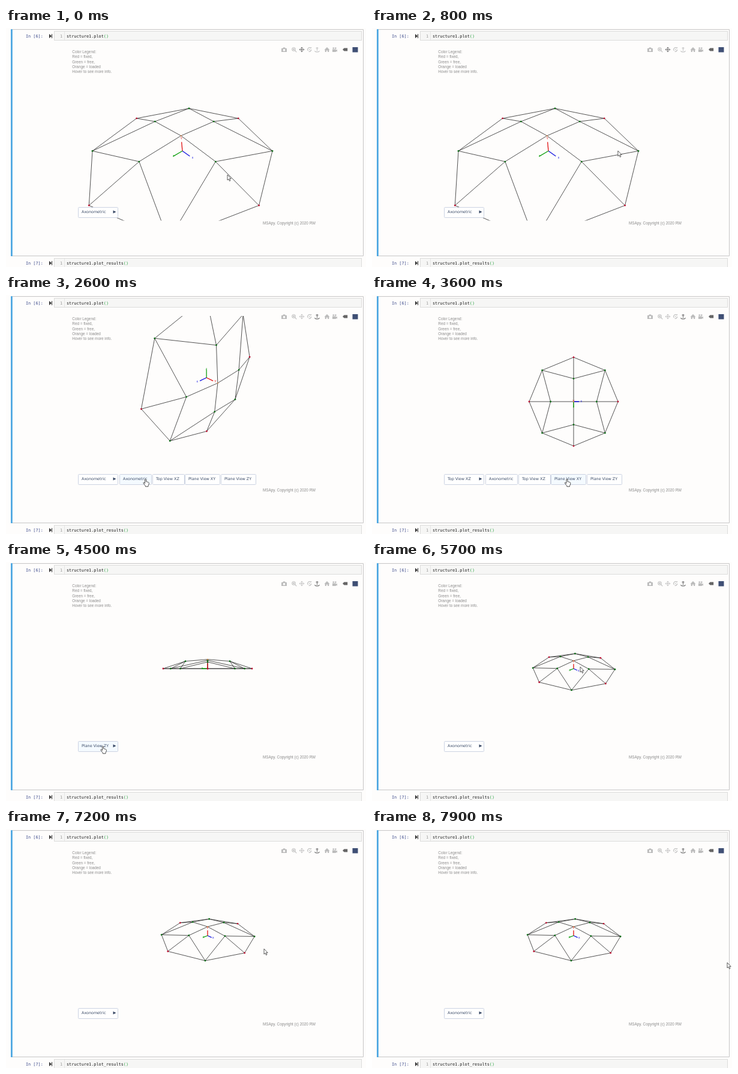
Animation of 600 by 399 pixels, one loop 8000 ms. Source, as an HTML page:

```html
<!DOCTYPE html>
<html lang="en">
<head>
<meta charset="utf-8">
<title>Dome viewer</title>
<style>
html, body { margin: 0; width: 100%; height: 100%; overflow: hidden; background: #fefdfc; }
svg { display: block; width: 600px; height: 399px; }
text { white-space: pre; }
.code { font: 6.85px "DejaVu Sans Mono", monospace; fill: #1c1c1c; }
.prompt { fill: #3c4a8c; }
.num { fill: #999; }
.paren { fill: #2aa040; }
.note { font: 6.37px Arial, "Liberation Sans", sans-serif; fill: #8c8c8c; }
.menu { font: 6.42px "DejaVu Sans", Verdana, sans-serif; fill: #3a4a66; }
.menu rect { stroke: #ccd3e2; stroke-width: 1; }
.tip { font: bold 6.9px Arial, "Liberation Sans", sans-serif; fill: #3a3a3a; }
.axis { font: 5px Arial, "Liberation Sans", sans-serif; text-anchor: middle; }
.icons { fill: none; stroke: #c2c2c2; stroke-width: 1.1; }
.icons .solid { fill: #bcbcbc; stroke: none; }
.icons .on { stroke: #6c6c6c; }
</style>
</head>
<body>
<svg id="stage" viewBox="0 0 600 399">
  <defs>
    <clipPath id="scene"><rect x="110" y="35" width="453" height="286.500"/></clipPath>
  </defs>

  <!-- notebook cells -->
  <path d="M10 2.500h585.500v378h-585.500" fill="none" stroke="#c6c6c6"/>
  <rect x="8" y="2" width="2.800" height="379" fill="#4fa8e2"/>
  <g id="cells"></g>

  <g class="note" id="legend"></g>
  <text class="note" x="428" y="328.300">MSApy. Copyright (c) 2020 RW</text>

  <g clip-path="url(#scene)">
    <path id="bars" fill="none" stroke="#262626" stroke-width=".8"/>
    <g id="triad"></g>
    <g id="nodes"></g>
  </g>

  <!-- mode bar -->
  <g class="icons">
    <path class="solid" fill-rule="evenodd" d="M459 34h2l1-1.500h3l1 1.500h2v6h-9zM463.500 35a1.900 1.900 0 1 0 .01 0z"/>
    <circle cx="479.500" cy="35.500" r="2.700"/>
    <path d="M481.500 37.500l2.800 2.800M478 35.500h3M479.500 34v3"/>
    <g id="pan">
      <path d="M489 36h8M493 32v8"/>
      <path d="M490.500 34.500L489 36l1.500 1.500M495.500 34.500L497 36l-1.500 1.500M491.500 33.500L493 32l1.500 1.500M491.500 38.500L493 40l1.500-1.500" stroke-width=".9"/>
    </g>
    <path d="M503.500 38a3.200 3.200 0 0 1 4.500-4.500l1.200-1M504.500 39.500q3.500 0 4.500-3.500M505 36.500l2-1"/>
    <g id="turn"><path d="M518.500 32v6M516.500 33.500h4M515 38c-1.500 2.500 8.500 2.500 7 0"/></g>
    <path class="solid" d="M530.500 36.500l4.500-4.500 4.500 4.500h-1.200v3.500h-2.300v-2.500h-2v2.500h-2.300v-3.500z"/>
    <path class="solid" d="M544 35.500h6v1.500l2-1.200v4l-2-1.200v1.400h-6zM544.500 32.500h2.500v2.300h-2.500zM548 32.500h2.500v2.300h-2.500z"/>
    <path d="M561 36l2.500-2.600h5.700v5.200h-5.700z" fill="#666" stroke="none"/>
    <rect x="577.500" y="32" width="9" height="8.500" fill="#3f4f75" stroke="none"/>
  </g>

  <g class="menu" id="menu"></g>

  <g class="tip" id="tip">
    <path d="M213.500 110.500h178v33l3.500 3.500-3.500 3.500v33.500h-178z" fill="#fff" stroke="#505050" stroke-width=".9"/>
  </g>

  <path id="arrow" d="M0 0v9l2-1.800 1.500 3.300 1.500-.7-1.500-3.200h2.700z" fill="#fff" stroke="#333" stroke-width=".8"/>
  <path id="hand" d="M-1 1q1-1.500 2 0v3.600l1.300.2 1.500.5 1.200.5q1 .4.900 1.500l-.6 2.700-.8 1.400v1.400h-4.700v-1.200l-2-2.600-1.500-2.200q.4-1.300 1.500-.5l1.200 1.200z" fill="#fff" stroke="#222" stroke-width=".8"/>
</svg>

<script>
const LOOP = 8000, STEP = 100;
const FOCAL = 345, CX = 336, CY = 178;

const $ = id => document.getElementById(id);
function add(parent, tag, attrs = {}, text = '') {
  const el = document.createElementNS('http://www.w3.org/2000/svg', tag);
  for (const k in attrs) el.setAttribute(k, attrs[k]);
  el.textContent = text;
  parent.appendChild(el);
  return el;
}
const show = (el, on) => { el.style.display = on ? '' : 'none'; };

// ---- static parts ----
function cell(y, n, call) {
  const g = add($('cells'), 'g', { class: 'code' });
  const base = y + 11;
  add(g, 'rect', { x: 80.5, y: y + .5, width: 512, height: 15, fill: '#f6f6f5', stroke: '#dcdcdb' });
  add(g, 'path', { d: `M97.5 ${y + 1}v14`, stroke: '#e6e6e5' });
  add(g, 'text', { x: 33, y: base, class: 'prompt' }, `In [${n}]:`);
  add(g, 'path', { d: `M72 ${y + 5}l4 3.5-4 3.5zM76 ${y + 5}h1v7h-1z`, fill: '#333' });
  add(g, 'text', { x: 90, y: base, class: 'num' }, '1');
  const line = add(g, 'text', { x: 101, y: base }, call);
  add(line, 'tspan', { class: 'paren' }, '()');
}
cell(5, 6, 'structure1.plot');
cell(384, 7, 'structure1.plot_results');

['Color Legend:', 'Red = fixed,', 'Green = free,', 'Orange = loaded', 'Hover to see more info.']
  .forEach((s, i) => add($('legend'), 'text', { x: 110.3, y: 42 + i * 8.25 }, s));

['Element #: 21', 'Name: W14X211', 'Length: 120.4', 'i node: N9', 'j node: N13',
  'End release: i=0, j=0', 'Web direction vector: [0.08304548 0.99654576 0.        ]', 'Member load: None']
  .forEach((s, i) => add($('tip'), 'text', { x: 214.7, y: 118.3 + i * 8.93 }, s));

// ---- dropdown ----
function button(x, w, label) {
  const g = add($('menu'), 'g');
  const box = add(g, 'rect', { x: x + .5, y: 299.5, width: w, height: 17, rx: 1 });
  const text = add(g, 'text', { x: x + 6, y: 309.4 }, label);
  return { g, box, text, has: p => p[0] > x && p[0] < x + w && p[1] > 299 && p[1] < 317 };
}
const main = button(120, 66, 'Axonometric');
add(main.g, 'path', { d: 'M178.5 304.5l5 2.5-5 2.5z' });
const items = [
  button(189, 53, 'Axonometric'), button(244, 53, 'Top View XZ'),
  button(298, 58, 'Plane View XY'), button(358, 58, 'Plane View ZY')
];

// ---- dome: eight rim nodes, four inner nodes, one apex ----
const polar = (r, h, deg) => {
  const a = deg * Math.PI / 180;
  return [r * Math.cos(a), h, r * Math.sin(a)];
};
const points = [], edges = [];
for (let k = 0; k < 8; k++) {
  points.push(polar(1, 0, k * 45));
  edges.push([k, (k + 1) % 8]);
}
for (let i = 0; i < 4; i++) {
  points.push(polar(.5, 1 / 6, i * 90));
  for (const d of [7, 0, 1]) edges.push([8 + i, (2 * i + d) % 8]);
  edges.push([8 + i, 12]);
}
points.push([0, 5 / 24, 0]);

const nodeColor = i => i === 12 ? '#e88a4a' : i < 8 && i % 2 === 0 ? '#bc1030' : '#0b6c14';
const dots = points.map((_, i) => add($('nodes'), 'circle', { r: i === 12 ? 1 : 1.4, fill: nodeColor(i) }));

const axes = [['x', '#1010e0', 1.38], ['Y', '#e01010', 1.35], ['z', '#10a010', 1]].map(([name, color, far], i) => ({
  dir: [0, 1, 2].map(j => j === i ? .125 : 0), far,
  line: add($('triad'), 'path', { stroke: color, 'stroke-width': 1.3 }),
  label: add($('triad'), 'text', { class: 'axis', fill: color }, name)
}));

// ---- camera ----
const dot = (a, b) => a[0] * b[0] + a[1] * b[1] + a[2] * b[2];
const cross = (a, b) => [a[1] * b[2] - a[2] * b[1], a[2] * b[0] - a[0] * b[2], a[0] * b[1] - a[1] * b[0]];
const unit = a => a.map(v => v / Math.hypot(...a));

function projector({ eye, up, dist, pan = [0, 0] }) {
  const front = unit(eye), right = unit(cross(up, front)), top = cross(front, right);
  return p => {
    const s = FOCAL / (dist - dot(p, front));
    return [CX + s * (dot(p, right) + pan[0]), CY - s * (dot(p, top) + pan[1])];
  };
}

const X = [1, 0, 0], Y = [0, 1, 0], Z = [0, 0, 1];
const VIEWS = {
  first: { eye: [1, 1, 1], up: Y, dist: 2.3, pan: [-.28, -.182] },
  tilted: { eye: [1, 1, 1], up: Z, dist: 2.83, pan: [-.015, .328] },
  axo: { eye: [.664, .431, .611], up: Y, dist: 5.04 },
  top: { eye: Y, up: [0, 0, -1], dist: 4.66 },
  xy: { eye: Z, up: Y, dist: 4.66 },
  zy: { eye: X, up: Y, dist: 4.66 }
};

// ---- timeline ----
const SHOTS = [
  [0, 'first', 0], [1900, 'tilted', 0], [2700, 'axo', 0], [3200, 'top', 1],
  [3700, 'xy', 2], [4200, 'zy', 3], [4900, 'axo', 0]
];
const OPEN = [[2400, 2700], [2900, 3200], [3400, 3700], [3900, 4200], [4600, 4900]];
const ZOOM = [[5700, 5.04], [5900, 2.9], [6100, 1.245], [6200, 1.245], [6300, 2.9], [6700, 4.45]];
const POINTER = [
  [0, 369, 245], [900, 415, 200], [1500, 528, 32], [1800, 528, 32], [1900, 520, 33], [2000, 520, 33],
  [2300, 160, 307], [2400, 160, 307], [2600, 232.5, 307], [2700, 225, 307], [2900, 160, 307],
  [3100, 270, 307], [3200, 270, 307], [3400, 160, 307], [3600, 325, 307], [3700, 325, 307],
  [3900, 160, 307], [4100, 385, 307], [4200, 385, 307], [4400, 161.5, 307], [4600, 161.5, 307],
  [4800, 215, 307], [5000, 215, 307], [5600, 347, 175], [5900, 347, 175], [6100, 400.7, 149.5],
  [6300, 400.7, 149.5], [7200, 430, 200], [7700, 592, 223]
];

function at(track, t) {
  let i = track.findIndex(k => k[0] > t);
  if (i < 0) i = track.length;
  const a = track[Math.max(i - 1, 0)], b = track[Math.min(i, track.length - 1)];
  const f = b[0] > a[0] ? (t - a[0]) / (b[0] - a[0]) : 0;
  return a.slice(1).map((v, j) => v + (b[j + 1] - v) * f);
}

const fmt = p => p.map(v => v.toFixed(2)).join(' ');

function drawDome(view) {
  const project = projector(view);
  const flat = points.map(project);
  $('bars').setAttribute('d', edges.map(([a, b]) => `M${fmt(flat[a])}L${fmt(flat[b])}`).join(''));
  dots.forEach((d, i) => {
    d.setAttribute('cx', flat[i][0]);
    d.setAttribute('cy', flat[i][1]);
  });
  const origin = project([0, 0, 0]);
  for (const { dir, far, line, label } of axes) {
    const end = project(dir);
    line.setAttribute('d', `M${fmt(origin)}L${fmt(end)}`);
    label.setAttribute('x', origin[0] + (end[0] - origin[0]) * far);
    label.setAttribute('y', origin[1] + (end[1] - origin[1]) * far + 1);
  }
}

function drawMenu(t, picked, p) {
  const open = OPEN.some(([a, b]) => t >= a && t < b);
  const hot = [main, ...(open ? items : [])].find(b => b.has(p));
  main.text.textContent = items[picked].text.textContent;
  items.forEach(b => show(b.g, open));
  for (const b of [main, ...items]) b.box.setAttribute('fill', b === hot ? '#f4faff' : '#fff');
  return Boolean(hot);
}

function render(t) {
  const [, name, picked] = SHOTS.filter(s => s[0] <= t).pop();
  const view = { ...VIEWS[name] };
  if (t >= ZOOM[0][0]) view.dist = at(ZOOM, t)[0];
  drawDome(view);

  const p = at(POINTER, t);
  const hand = drawMenu(t, picked, p);
  for (const [id, on] of [['arrow', !hand], ['hand', hand]]) {
    $(id).setAttribute('transform', `translate(${fmt(p)})`);
    show($(id), on);
  }
  const turning = t >= 1900;
  for (const [id, on] of [['pan', !turning], ['turn', turning]])
    for (const el of $(id).children) el.classList.toggle('on', on);
  show($('tip'), t >= 6200 && t < 6300);
}

const begin = performance.now();
function tick() {
  const t = (performance.now() - begin) % LOOP;
  render(Math.floor(t / STEP) * STEP);
  requestAnimationFrame(tick);
}
tick();
</script>
</body>
</html>
```
